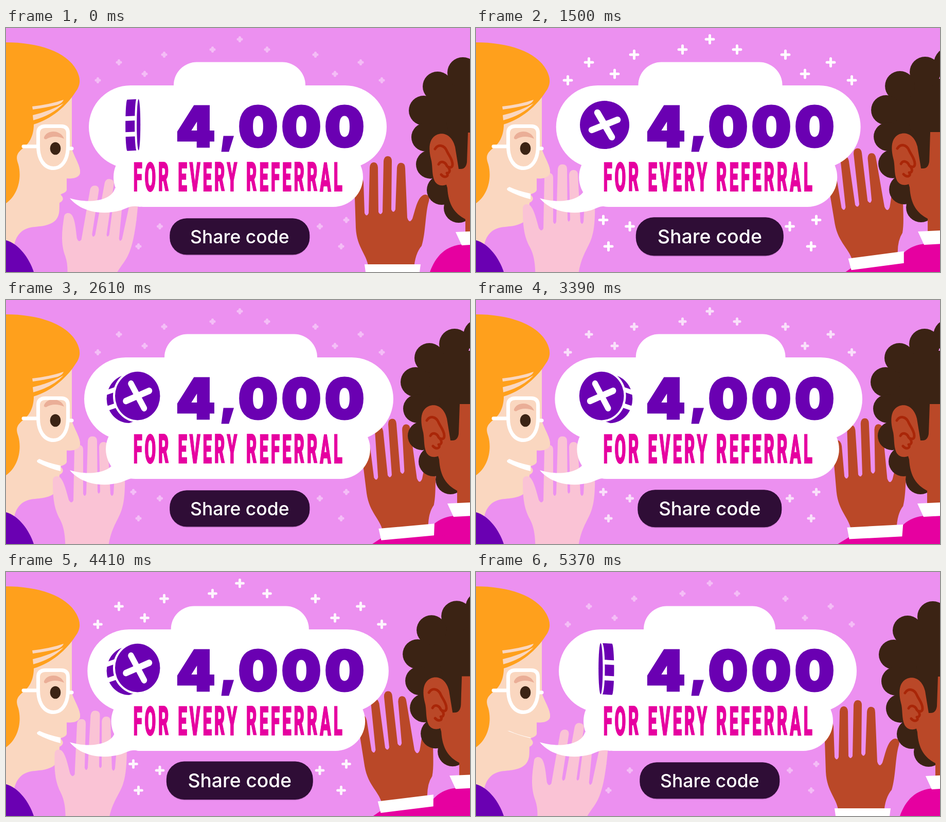
Animation, 902 px wide and 476 px high, one loop 5.4 s. Source, as an HTML page:

```html
<!DOCTYPE html>
<html lang="en">
<head>
<meta charset="utf-8">
<title>Referral</title>
<style>
html, body { margin: 0; width: 100%; height: 100%; overflow: hidden; background: #ec90f0; }
svg { display: block; width: 100vw; height: 100vh; }
.amount { font: 900 107px Inter, sans-serif; fill: #6a00b2; stroke: #6a00b2; stroke-width: 5; text-anchor: middle; }
.amount .comma { font-size: 80px; }
.tagline { font: 900 77px Roboto, sans-serif; letter-spacing: 11.8px; fill: #e600a0; stroke: #e600a0; stroke-width: 2; text-anchor: middle; }
.label { font: 500 35.5px Inter, sans-serif; fill: #fff; text-anchor: middle; }
.line { fill: none; stroke-linecap: round; stroke-linejoin: round; }
</style>
</head>
<body>
<svg viewBox="0 0 902 476" preserveAspectRatio="none">
  <defs>
    <clipPath id="lens"><rect x="64" y="194" width="56" height="78" rx="12"/></clipPath>
  </defs>
  <rect width="902" height="476" fill="#ec90f0"/>
  <path id="pluses" class="line" stroke="#fff" stroke-width="5"/>

  <!-- listener -->
  <path id="manBody" fill="#e600a0" d="M822 482C833 448 852 424 890 422H940V500H815Z"/>
  <g id="manHand">
    <path fill="#ba4828" d="M705 470C703 442 682 430 680 390L678 330Q677 290 686 290Q694 290 695 302L697 361Q701 370 705 361L707 272Q708 262 715 262Q722 262 723 272L724 359Q728 367 732 359L734 260Q735 250 742 250Q750 250 750 260L749 354Q753 363 757 354L760 273Q761 263 768 263Q776 263 776 274L780 370Q784 383 790 372C796 355 800 325 816 325Q825 327 822 338C815 360 816 400 808 425Q795 440 793 470Z"/>
    <path fill="#e600a0" d="M672 495L704 478L804 483L850 490L850 570H660Z"/>
    <path fill="#fff" d="M697 461H806L803 484H700Z"/>
  </g>
  <g id="manHead">
    <g id="curls" fill="#3b2314"><path d="M840 100H940V290H860V350L830 300L810 200Z"/></g>
    <path fill="#ba4828" d="M850 285L858 312C860 345 872 362 893 373V402H940V204H896V260L878 275Z"/>
    <path fill="#3b2314" d="M855 180H940V204H898Q897 235 896 262Q894 275 884 275H876Z"/>
    <path fill="#ba4828" d="M873 232C867 209 851 203 838 208C822 215 821 235 826 255C830 268 827 285 833 298C840 312 860 309 866 296L880 275Z"/>
    <path class="line" stroke="#a92608" stroke-width="5"
      d="M834 236C840 226 852 228 857 240C861 249 868 256 868 266C868 272 864 273 860 271M841 266C845 258 854 261 857 269C866 277 862 284 857 283C862 289 853 294 846 286"/>
    <path fill="#fff" d="M874 398L940 395V421L886 424Z"/>
  </g>

  <!-- speaker -->
  <path fill="#fad7c0" d="M0 110H128V238C133 252 144 268 144 281C144 291 132 295 118 293L118 314C119 321 110 322 106 325C112 330 113 337 104 341C103 352 107 370 90 380C70 391 50 384 33 395C22 403 15 415 14 440H0Z"/>
  <path id="mouth" fill="#fff"/>
  <path fill="#6a00b2" d="M0 414C25 421 45 449 54 476H0Z"/>
  <path id="womanHand" fill="#fac3d5" d="M91 352C91 342 102 342 106 347C113 355 117 372 122 390Q127 399 131 391L133 292Q134 283 142 283Q150 283 150 292L150 378Q153 386 156 378L159 275Q160 266 168 266Q177 266 177 275L178 374Q180 381 183 374L181 286Q182 277 190 277Q198 277 198 287L203 378Q206 386 209 378L213 310Q215 300 222 302Q230 304 230 316C232 350 232 385 226 405C220 430 200 445 197 500H115C116 470 115 447 105 428C92 405 91 380 91 352Z"/>
  <path fill="#fad7c0" d="M110 236H128C133 252 144 268 144 281C144 291 132 295 110 293Z"/>
  <path fill="#ffa01c" d="M0 28C62 28 118 46 137 82C146 99 145 112 135 125C118 152 88 178 54 188C54 212 44 227 31 236C20 246 19 252 24 266C31 292 24 325 0 342Z"/>
  <path fill="#fad7c0" d="M51 153Q86 149 112 140Q110 146 100 150Q75 156 52 159ZM52 170Q86 162 112 147Q90 170 53 180Z"/>
  <g clip-path="url(#lens)"><path id="brow" fill="#eaae97" d="M74 213C80 198 106 198 113 216C100 210 88 211 78 217Q73 217 74 213Z"/></g>
  <ellipse cx="96" cy="235" rx="10.3" ry="12.3" fill="#3b2314"/>
  <path class="line" stroke="#fff" stroke-width="7" d="M77 191.500H107Q120.500 191.500 120.500 205V230C120.500 257 109 273.500 92 273.500C75 273.500 62.500 257 62.500 230V205Q62.500 191.500 77 191.500ZM34 231H61M122 235H128"/>

  <!-- message -->
  <g fill="#fff">
    <rect id="cloudTop" y="66.500" height="110" rx="45"/>
    <rect id="cloudMid" y="112" height="162" rx="81"/>
    <rect id="cloudLow" y="233" height="116" rx="58"/>
    <path d="M124 332C155 342 205 340 212 312L262 349C240 345 236 352 222 356C185 366 145 358 124 332Z"/>
  </g>
  <g id="coin">
    <path id="coinEdge" fill="#6a00b2"/>
    <path id="coinGaps" stroke="#fff" stroke-width="9"/>
    <ellipse id="coinFace" fill="#6a00b2" stroke="#fff" stroke-width="8" paint-order="stroke"/>
    <path id="coinCross" class="line" stroke="#fff" stroke-width="12.5" d="M-14 -24L14 24M-25 10L25 -10"/>
  </g>
  <text class="amount" y="230.500"><tspan x="368.500">4</tspan><tspan class="comma" x="432" y="222">,</tspan><tspan x="490" y="230.500">0</tspan><tspan x="574">0</tspan><tspan x="658">0</tspan></text>
  <text class="tagline" transform="translate(453 318) scale(.41 1)">FOR EVERY REFERRAL</text>
  <g id="button">
    <rect x="-135.500" y="-34" width="271" height="71" rx="33" fill="#2f0d36" opacity=".2"/>
    <rect x="-136" y="-35.500" width="272" height="71" rx="33" fill="#2f0d36"/>
    <text class="label" y="13">Share code</text>
  </g>
</svg>
<script>
const LOOP = 5400, STEP = 30;
const $ = id => document.getElementById(id);
const set = (id, attrs) => { for (const k in attrs) $(id).setAttribute(k, attrs[k]); };
const clamp = (v, lo = 0, hi = 1) => Math.min(hi, Math.max(lo, v));
const ramp = (t, a, b) => clamp((t - a) / (b - a));
const wave = p => (1 - Math.cos(2 * Math.PI * p)) / 2;
const ease = (t, a, b) => wave(ramp(t, a, b) / 2);
const mix = (a, b, k) => a + (b - a) * k;

// Sparkle centres, mirrored about the middle of the stage
const sparkles = [[0, 22], [53, 42], [147, 52], [235, 67], [185, 89.5], [276, 102], [207, 374.5], [155.5, 387], [197, 426]];

// Time, x, y and turn of the listener's hand
const handKeys = [[0, 0, 0, 0], [810, 5, -8.5, -4], [1500, 13, -17.5, -7.5], [2610, 18, -19.5, -5.2],
  [3390, 19, -20, -3], [4410, 13, -19.5, -7], [LOOP, 0, 0, 0]];

// Centre and radius of each curl
const curls = [[937, 70, 32], [888, 87, 30], [839, 114, 29], [812, 161, 29], [816, 213, 28], [825, 266, 28], [847, 316, 29], [880, 351, 29]];

function spline(keys, t, c) {
  const i = clamp(keys.findIndex(k => k[0] > t) - 1, 0, keys.length - 2);
  const slope = j => {
    const a = keys[j - 1], b = keys[j + 1];
    return a && b ? (b[c] - a[c]) / (b[0] - a[0]) : 0;
  };
  const [p, q] = [keys[i], keys[i + 1]], h = q[0] - p[0], u = (t - p[0]) / h;
  return mix(p[c], q[c], u * u * (3 - 2 * u)) + h * u * (1 - u) * ((1 - u) * slope(i) - u * slope(i + 1));
}

for (const [cx, cy, r] of curls) {
  const curl = document.createElementNS("http://www.w3.org/2000/svg", "circle");
  for (const [k, v] of Object.entries({ cx, cy, r })) curl.setAttribute(k, v);
  $("curls").append(curl);
}

function span(id, left, right) { set(id, { x: left, width: right - left }); }

function drawCoin(t) {
  const raw = ((t + 15) % 600) / 600 * Math.PI - Math.PI / 2;
  const a = raw - 0.08 * Math.cos(raw);
  const rx = 48 * Math.min(1, 1.02 * Math.cos(a)), ry = 47 + 3 * Math.abs(Math.sin(a)) ** 3;
  const dx = 22 * Math.sin(clamp(1.8 * a, -Math.PI / 2, Math.PI / 2));
  const dy = 7 * Math.abs(Math.sin(2 * a)), side = Math.sign(dx);
  const cx = 250 - .35 * dx, cy = 189 - dy / 3;
  const sweep = side > 0 ? 1 : 0;
  set("coinEdge", { d: `M${cx} ${cy - ry}L${cx + dx} ${cy + dy - ry}A${rx} ${ry} 0 0 ${sweep} ${cx + dx} ${cy + dy + ry}L${cx} ${cy + ry}Z` });
  const gap = y => {
    const x = cx + side * rx * Math.sqrt(1 - (y / ry) ** 2);
    return `M${x} ${cy + y}L${x + dx * 1.3} ${cy + y + dy * 1.3}`;
  };
  set("coinGaps", { d: gap(-13) + gap(18) });
  set("coinFace", { cx, cy, rx, ry });
  set("coinCross", { transform: `translate(${cx} ${cy}) scale(${rx / 48} 1)` });
  $("coinCross").style.display = rx < 7 ? "none" : "";
}

function draw(t) {
  const pulse = wave(t / 2700), swell = wave(t / LOOP);
  const lean = ease(t, 0, 1800) - ease(t, 3900, LOOP);
  const raised = ease(t, 0, 800) - ease(t, 4050, LOOP);
  const open = ease(t, 0, 600) - ramp(t, 4800, 5450);
  const lift = wave(ramp(t, 480, 1140)) + wave(ramp(t, 2280, 2940));

  const arm = mix(3.5, 7.5, pulse);
  const plus = (x, y) => `M${x - arm} ${y}h${2 * arm}M${x} ${y - arm}v${2 * arm}`;
  set("pluses", {
    d: sparkles.map(([dx, y]) => plus(454.5 - dx, y) + (dx ? plus(454.5 + dx, y) : "")).join(""),
    "stroke-opacity": mix(.4, 1, pulse)
  });
  set("button", { transform: `translate(454.3 406.7) scale(${1 + .057 * pulse})` });

  span("cloudTop", mix(326, 308, swell), mix(582, 605, swell));
  span("cloudMid", mix(161, 152, swell), mix(740, 753, swell));
  span("cloudLow", mix(209, 194, swell), mix(694, 708, swell));

  for (const id of ["manBody", "manHead"]) set(id, { transform: `translate(${-16 * lean} ${-lean})` });
  const [x, y, turn] = [1, 2, 3].map(c => spline(handKeys, t, c));
  set("manHand", { transform: `translate(${x} ${y}) rotate(${turn} 752 360)` });

  const down = 1 - raised;
  set("womanHand", { transform: `translate(${15 * down} ${21 * down}) rotate(${8.7 * down} 127 395)` });
  set("brow", { transform: `translate(0 ${-8 * lift})` });
  const m = 11 * open;
  set("mouth", { d: m > .2 ? `M65 310Q82 318 106 323V${323 + m}Q82 ${317 + m} 62 ${309 + m * .75}Q57 ${309 + m * .4} 65 310Z` : "" });

  drawCoin(t);
}

function tick() {
  draw(Math.floor(performance.now() % LOOP / STEP) * STEP);
  requestAnimationFrame(tick);
}
tick();
</script>
</body>
</html>
```
